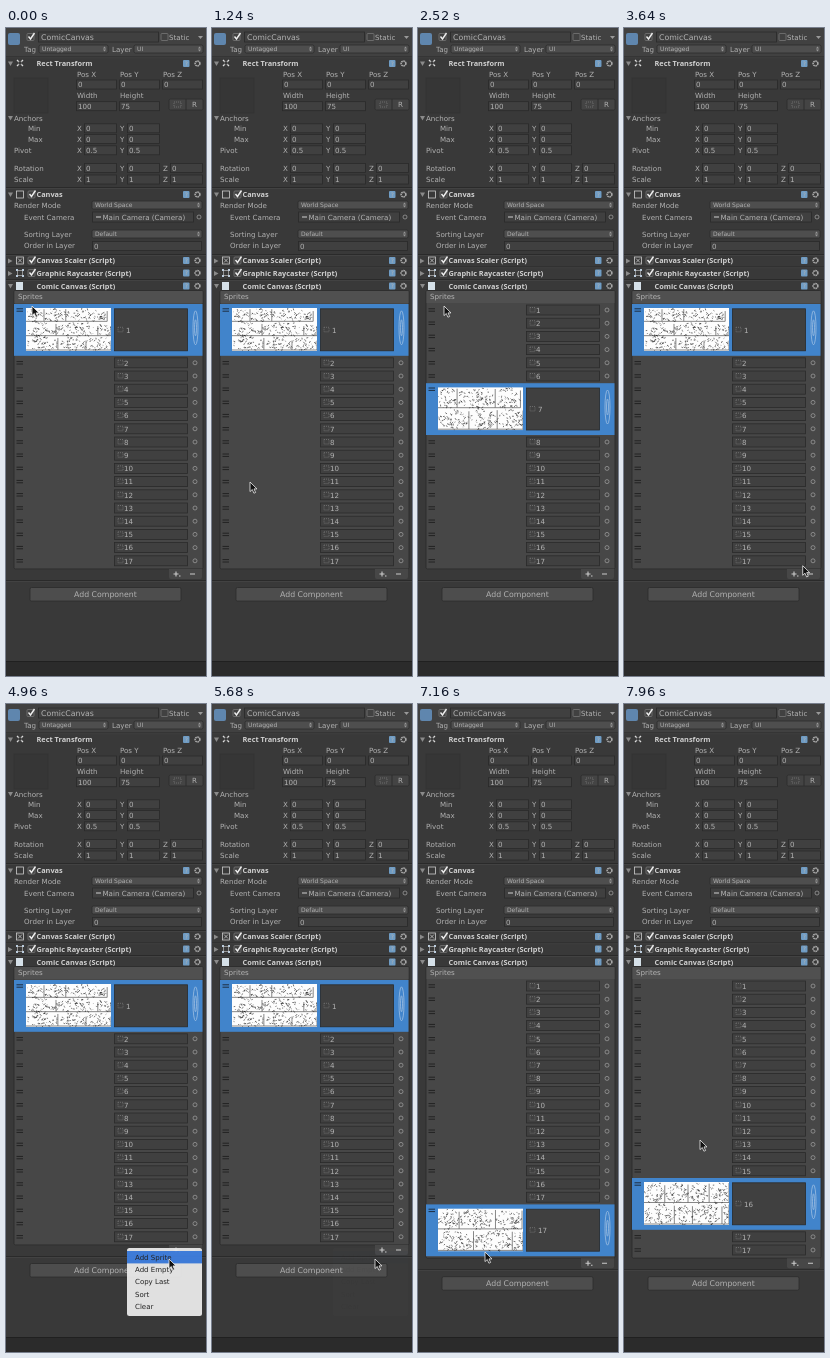
Recreate the animation shown at these times as an HTML page. Size 200 px wide and 648 px high, loop 8000 ms.

```html
<!DOCTYPE html>
<html lang="en">
<head>
<meta charset="utf-8">
<title>Inspector list</title>
<style>
  html, body { margin: 0; width: 100%; height: 100%; overflow: hidden; background: #393939; }
  svg { display: block; width: 100vw; height: 100vh; }
  text { font: 7.1px "DejaVu Sans", sans-serif; fill: #b2b2b2; white-space: pre; }
  .bold { font: bold 7.35px "Open Sans", sans-serif; fill: #d0d0d0; }
  .small { font-size: 6px; }
  .big { font-size: 7.8px; }
  .menu { font-size: 7px; fill: #222; }
</style>
</head>
<body>
<svg viewBox="0 0 200 648">
  <g id="panel"></g>
  <g id="list"></g>
  <g id="foot"></g>
  <g id="menu"></g>
  <path id="cursor" d="M0 0V9.6L2.3 7.5L3.9 11.2L5.6 10.5L4 6.9H7Z" fill="#111" stroke="#eee" stroke-width=".8"/>
</svg>
<script>
const LOOP = 8000, TOP = 275.4, ROW = 13.2, EXTRA = 39.6;
const $ = id => document.getElementById(id);

// Drawing helpers; text is placed by its vertical centre
const text = (x, y, s, cls = '') => `<text x="${x}" y="${y + 2.6}" class="${cls}">${s}</text>`;
const rect = (x, y, w, h, fill, extra = '') =>
  `<rect x="${x}" y="${y}" width="${w}" height="${h}" fill="${fill}" ${extra}/>`;
const edge = (color, extra = '') => `stroke="${color}" stroke-width=".8" ${extra}`;
const line = (d, color, w = 1) => `<path d="${d}" fill="none" stroke="${color}" stroke-width="${w}"/>`;
const fill = (d, color) => `<path d="${d}" fill="${color}"/>`;
const ring = (x, y, rx = 2, ry = rx, color = '#999') =>
  `<ellipse cx="${x}" cy="${y}" rx="${rx}" ry="${ry}" fill="none" ${edge(color)}/>`;
const box = (x1, x2, y, h = 9) => rect(x1 + .5, y - h / 2, x2 - x1 - 1, h, '#404040', edge('#2a2a2a'));
const field = (x1, x2, y, s) => box(x1, x2, y) + text(x1 + 2, y, s);
const popup = (x1, x2, y, s) =>
  rect(x1, y - 4, x2 - x1, 8, '#4e4e4e', edge('#2b2b2b', 'rx="1.5"')) + text(x1 + 3, y - .3, s, 'small') +
  fill(`M${x2 - 5} ${y - .5}h3l-1.5-2zm0 1h3l-1.5 2z`, '#999');
const check = (x, y, on) =>
  rect(x, y - 3.5, 7, 7, '#414141', edge('#777', 'rx="1"')) +
  (on ? line(`M${x + 1.5} ${y - .5}l2 2.5l4-6`, '#eee', 1.4) : '');
const fold = (x, y, open) => fill(`M${x} ${y - 2}${open ? 'h5l-2.5 4.5z' : 'v5l4.5-2.5z'}`, '#8a8a8a');
const divider = y => rect(0, y, 200, 1, '#2a2a2a') + rect(0, y + 1, 200, .6, '#484848');
const frame = (x, y, w, h, color) => rect(x, y, w, h, 'none', edge(color));
const dotted = (x, y, w, h) => rect(x, y, w, h, 'none', edge('#777', 'stroke-dasharray="1 1"'));
const column = i => 71 + 43 * i;

const header = (y, title, open, toggle) =>
  fold(2, y, open) + (toggle ? check(22, y, true) : '') + text(30.5, y, title, 'bold') +
  rect(177, y - 3.5, 6.5, 7, '#6f9cc4', 'rx="1"') + text(178.7, y - .2, '?', 'small') +
  `<circle cx="191.5" cy="${y}" r="2.4" fill="none" stroke="#aaa" stroke-width="1.6" stroke-dasharray="1.5 .5"/>`;

const axes = (y, label, values, indent = 8) =>
  text(indent, y, label) + values.map((v, i) =>
    text(column(i), y, 'XYZ'[i]) + field(column(i) + 7, column(i) + 40, y, v)).join('');

const size = (i, y, label, value) =>
  text(column(i), y, label) + field(column(i) - 1, column(i) + 40, y + 10.5, value);

function inspector() {
  let s = rect(0, 0, 200, 648, '#393939') + rect(0, 0, 200, 29, '#414141');
  s += rect(2, 5, 12, 12, '#5f86ae', 'rx="2"');
  s += check(21, 9, true) + box(32, 153, 9, 10) + text(35, 9, 'ComicCanvas', 'big');
  s += check(155, 9) + text(163, 9, 'Static') + fill('M192 8h5l-2.5 3z', '#999');
  s += text(18, 21, 'Tag') + popup(33, 102, 21, 'Untagged');
  s += text(106, 21, 'Layer') + popup(128, 197, 21, 'UI') + divider(28.5);

  s += header(35.5, 'Rect Transform', true);
  s += line('M11 32l6 6M17 32l-6 6', '#ddd', 1.3) + rect(12.5, 33.5, 3, 3, '#393939');
  s += rect(8, 50, 34, 35, '#363636', edge('#333'));
  s += ['Pos X', 'Pos Y', 'Pos Z'].map((label, i) => size(i, 46, label, 0)).join('');
  s += size(0, 67.7, 'Width', 100) + size(1, 67.7, 'Height', 75);
  s += rect(163, 71, 34, 11, '#444', edge('#2d2d2d', 'rx="1.5"')) + line('M180 71v11', '#2d2d2d');
  s += dotted(168, 74, 7, 5) + text(186, 76.5, 'R');
  s += fold(2, 90, true) + text(8, 90, 'Anchors');
  s += axes(100.3, 'Min', [0, 0], 22) + axes(111, 'Max', [0, 0], 22) + axes(122.3, 'Pivot', [.5, .5]);
  s += axes(140, 'Rotation', [0, 0, 0]) + axes(151.5, 'Scale', [1, 1, 1]) + divider(159);

  s += header(166.5, 'Canvas', true, true) + frame(10.5, 163, 7, 7, '#ccc');
  s += text(8, 177.5, 'Render Mode') + popup(86, 196, 177, 'World Space');
  s += text(18, 189, 'Event Camera') + box(86, 188, 189, 10);
  s += rect(90, 188, 5, 2, '#888') + text(96.5, 189, 'Main Camera (Camera)') + ring(193, 189);
  s += text(18, 206.5, 'Sorting Layer') + popup(86, 196, 206, 'Default');
  s += text(18, 217.5, 'Order in Layer') + field(86, 196, 218, 0) + divider(226);

  s += header(232.5, 'Canvas Scaler (Script)', false, true) + frame(10.5, 229, 7, 7, '#ccc');
  s += line('M12 234.5l4-4M12 230.5l4 4', '#ccc', .8) + divider(238.5);
  s += header(245, 'Graphic Raycaster (Script)', false, true) + frame(11.5, 242.5, 5, 5, '#aaa');
  s += line('M10 242h8M10 248h8', '#bcd', '2" stroke-dasharray="2 4') + divider(251);
  s += header(258, 'Comic Canvas (Script)', true) + rect(10, 254, 7, 8, '#d5e0e8');
  return s + rect(0, 633, 200, 1, '#202020') + rect(0, 634, 200, 14, '#2b2b2b');
}

// Comic page: seeded panels in strips, scattered with thin ink strokes
function page(id, x0, y0) {
  let seed = id * 977 + 31, ink = '', frames = '';
  const rnd = n => (seed = seed * 16807 % 2147483647) / 2147483647 * n;
  const strips = id ? 2 : 3, h = 43 / strips;
  for (let y = 0; y < 42; y += h) {
    for (let x = 0, w; x < 80; x += w) {
      w = Math.min(85 - x, 18 + rnd(24));
      frames += `M${x} ${y + h - 1}h${w}v${-h + 2 + rnd(3)}`;
      for (let i = 0; i < w * h / 9; i++) {
        const a = rnd(7), r = Math.sqrt(rnd(1));
        ink += `M${x + w / 2 + Math.cos(a) * r * w / 2} ${y + h / 2 + Math.sin(a) * r * h / 2}l${rnd(4) - 2} ${rnd(3) - 1}`;
      }
    }
  }
  return `<svg x="${x0}" y="${y0}" width="85" height="43">` +
    rect(0, 0, 85, 43, '#fdfdfd') + line(frames, '#555', .7) + line(ink, '#1a1a1a', .6) + '</svg>';
}

function rows(sel, count) {
  const bottom = TOP + count * ROW + EXTRA;
  let s = rect(8, 262.5, 189, bottom - 261, '#474747', edge('#2a2a2a', 'rx="1.5"'));
  s += rect(8.5, 263, 188, 12, '#505050') + text(12, 268.5, 'Sprites');
  for (let i = 0; i < count; i++) {
    const on = i === sel, y = TOP + i * ROW + (i > sel ? EXTRA : 0);
    const mid = y + (on ? 26.4 : 6.6);
    if (on) s += rect(8, y + .6, 188.5, ROW + EXTRA - 1, '#4184cb') + page(i, 20, y + 4.6);
    s += line(`M10.5 ${y + 5.4}h6.5m-6.5 2.4h6.5`, on ? '#1d2d40' : '#222');
    s += box(108, 182, mid, on ? 42 : 10) + dotted(112, mid - 2.5, 5, 4.5);
    s += text(on ? 120 : 118, mid + .2, Math.min(i + 1, 17));
    s += on ? ring(189.5, mid - 2, 2.5, 17, '#9fbfe2') + ring(189.5, mid - 2, 1, 8, '#9fbfe2') : ring(189, mid);
  }
  return s;
}

const footer = count => `<g transform="translate(0 ${(count - 17) * ROW})">` +
  fill('M163 541h33v8q0 2-2 2h-29q-2 0-2-2z', '#474747') +
  line('M167.5 546h5m-2.5-2.5v5M184 546h5M173 548h1.5', '#ccc', 1.1) + divider(552) +
  rect(24, 559.5, 151, 13.5, '#4d4d4d', edge('#2b2b2b', 'rx="1.5"')) +
  text(68, 566, 'Add Component', 'big') + '</g>';

const menu = hover => rect(121, 544, 75, 68, '#e9e9e9', 'rx="2.5"') +
  (hover ? rect(121, 547, 75, 12.4, '#3f7fe0') : '') +
  ['Add Sprite', 'Add Empty', 'Copy Last', 'Sort', 'Clear']
    .map((s, i) => text(129, 553 + i * 12.4, s, 'menu')).join('');

// Pointer moves [from ms, to ms, x, y]; it rests in between
const HOME = [26, 278];
const MOVES = [
  [560, 880, 42, 491], [880, 1240, 38, 454], [1760, 2000, 38, 354], [2200, 2520, ...HOME],
  [2920, 3720, 183, 545], [3760, 4040, 167, 543], [4840, 4960, 163, 555],
  [5680, 5900, 90, 329], [5900, 6120, 36, 491], [6240, 6480, 68, 543],
  [7080, 7160, 67, 548], [7160, 7480, 78, 261], [7480, 7840, 78, 481], [7880, 7960, 76, 436]
];
// List states [from ms, selected row, row count]
const STATES = [[0, 0, 17], [1320, 10, 17], [2200, 6, 17], [2600, 0, 17], [5760, 0, 18], [6640, 17, 18], [7840, 15, 18]];

const clamp = v => Math.max(0, Math.min(1, v));
let shown, hovered;

function pointer(t) {
  let [x, y] = HOME;
  for (const [from, to, tx, ty] of MOVES) {
    const u = clamp((t - from) / (to - from)), e = u * u * (3 - 2 * u);
    x += (tx - x) * e;
    y += (ty - y) * e;
  }
  return `translate(${x} ${y})`;
}

function draw(t) {
  const state = STATES.findLast(s => s[0] <= t), hover = t >= 4880;
  if (state !== shown) {
    shown = state;
    $('list').innerHTML = rows(state[1], state[2]);
    $('foot').innerHTML = footer(state[2]);
  }
  if (hover !== hovered) $('menu').innerHTML = menu(hovered = hover);
  $('menu').setAttribute('opacity', .95 * Math.min(clamp((t - 4440) / 120), clamp((5685 - t) / 300)));
  $('cursor').setAttribute('transform', pointer(t));
}

$('panel').innerHTML = inspector();
const start = performance.now();
function tick() {
  draw((performance.now() - start) % LOOP);
  requestAnimationFrame(tick);
}
tick();
</script>
</body>
</html>
```
